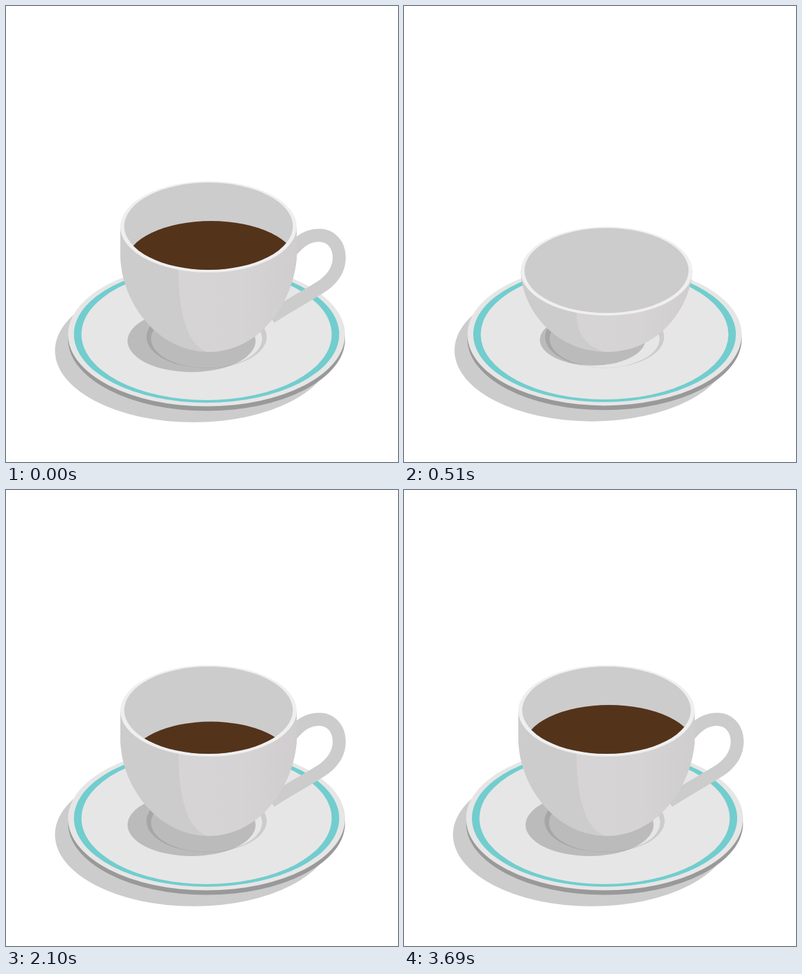
An HTML page with a canvas for the animation above (4290 ms loop, 600x700 px).

```html
<!DOCTYPE html>
<html lang="en">
<head>
<meta charset="utf-8">
<title>Cup of coffee</title>
<style>
html, body { margin: 0; width: 100%; height: 100%; overflow: hidden; background: #fff; }
canvas { display: block; width: 600px; height: 700px; }
</style>
</head>
<body>
<canvas id="stage" width="600" height="700"></canvas>
<script>
const LOOP = 4290, STEP = 30;
const ctx = document.getElementById('stage').getContext('2d');

const linear = u => u;
const smooth = u => u * u * (3 - 2 * u);

// Value of a [time, value] track at time t.
function at(t, track, ease = linear) {
  if (t <= track[0][0]) return track[0][1];
  for (let i = 1; i < track.length; i++) {
    const [t0, a] = track[i - 1], [t1, b] = track[i];
    if (t <= t1) return a + (b - a) * ease((t - t0) / (t1 - t0));
  }
  return track[track.length - 1][1];
}

const SAUCER = [[0, 0], [120, 1.104], [240, 0.99], [510, 0.99], [600, 1.034], [750, 1]];
const POP = [[240, 0], [300, 1]];
const HEIGHT = [[240, 48], [510, 124], [600, 192]];
const STRETCH = [[570, 1], [660, 1.05], [840, 0.9885], [990, 1]];
const HANDLE = [[570, 0], [720, 1]];
const LIQUID_TOP = [[1260, 406], [1500, 387], [1770, 369], [2310, 347], [2640, 330]];
const LIQUID_R = [[1260, 74], [1500, 80], [1770, 116], [2310, 126], [2640, 129]];

const WISP = new Path2D('M-4-113C-20-85-12-68-2-54C8-40 6-18 0 0' +
  'C14-20 14-40 4-55C-8-72-12-88-4-113Z');
const HANDLE_PATH = new Path2D('M436 377C450 360 462 352 479 352C498 352 510 367 510 386' +
  'C510 402 502 416 488 427C470 440 440 455 405 478');

const WISPS = [
  { x: 313, sx: 1, sy: 1, y: [[2340, 306], [2700, 263], [2850, 245], [3075, 218]],
    head: [[2310, 0], [2640, 1]], tail: [[2990, 0], [3330, 1]] },
  { x: 381, sx: -0.8, sy: 0.8, y: [[2220, 330], [2700, 295], [3300, 274]],
    head: [[2220, 0], [2620, 1]], tail: [[3330, 0], [3690, 1]] },
  { x: 257, sx: 0.85, sy: 0.85, y: [[2400, 330], [2700, 310], [3300, 281]],
    head: [[2400, 0], [2800, 1]], tail: [[3060, 0], [3420, 1]] }
];

function oval(x, y, rx, ry, fill) {
  ctx.beginPath();
  ctx.ellipse(x, y, rx, ry, 0, 0, 2 * Math.PI);
  if (fill) {
    ctx.fillStyle = fill;
    ctx.fill();
  }
}

function scaled(x, y, sx, sy, draw) {
  ctx.save();
  ctx.translate(x, y);
  ctx.scale(sx, sy);
  ctx.translate(-x, -y);
  draw();
  ctx.restore();
}

function saucer() {
  oval(287, 529, 212, 110, '#ccc');
  oval(307, 511.5, 212, 110, '#999');
  oval(307, 504.5, 212, 110, '#e6e6e6');
  oval(307, 504, 203, 105, '#72cdce');
  oval(307, 504, 191.5, 101, '#e6e6e6');
  oval(307, 508, 92, 48, '#ccc');
  oval(307, 510.8, 85, 44.8, '#e6e6e6');
}

function cupShadow(h) {
  const k = 0.5 + 0.5 * h / 192;
  oval(310 - 26 * k, 505 + 9 * k, 98 * k, 48 * k, 'rgba(0,0,0,.19)');
}

function handle(k) {
  if (k <= 0) return;
  scaled(436, 420, k, k, () => {
    ctx.lineWidth = 20;
    ctx.strokeStyle = '#ccc';
    ctx.stroke(HANDLE_PATH);
  });
}

function body(cy, rx, h) {
  const x0 = 310 - rx, x1 = 310 + rx;
  const wall = cy + 46 * Math.max(0, (h - 124) / 68);
  const side = wall + (531 - wall) * 0.48;
  ctx.save();
  ctx.beginPath();
  ctx.moveTo(x0, cy);
  ctx.lineTo(x0, wall);
  ctx.bezierCurveTo(x0 + 2, side, 232, 531, 310, 531);
  ctx.bezierCurveTo(388, 531, x1 - 5, side, x1, wall);
  ctx.lineTo(x1, cy);
  ctx.closePath();
  ctx.fillStyle = '#cdcccc';
  ctx.fill();
  ctx.clip();

  const top = cy + rx * 0.48;
  const shade = ctx.createLinearGradient(264, 0, 445, 0);
  shade.addColorStop(0, '#d7d4d5');
  shade.addColorStop(0.55, '#d6d3d4');
  shade.addColorStop(1, '#cfcdcd');
  ctx.beginPath();
  ctx.moveTo(264, cy);
  ctx.lineTo(264, top);
  ctx.bezierCurveTo(264, top + (531 - top) * 0.5, 276, 522, 310, 532);
  ctx.lineTo(460, 532);
  ctx.lineTo(460, cy);
  ctx.fillStyle = shade;
  ctx.fill();
  ctx.restore();
}

function inside(t, cy, rx, h) {
  oval(310, cy, rx, rx * 0.5185, '#efefef');
  oval(310, cy - 1, rx * 0.956, rx * 0.496, '#ccc');
  ctx.save();
  ctx.clip();
  oval(310, 424 + (192 - h) * 1.4, 82, 40, '#bcbcbc');
  if (t >= 1260) {
    const r = at(t, LIQUID_R), ry = r * 0.48;
    oval(310 + (r - 80) * 0.08, at(t, LIQUID_TOP) + ry, r, ry, '#54331b');
  }
  ctx.restore();
}

function cup(t) {
  const h = at(t, HEIGHT), pop = at(t, POP);
  if (pop <= 0) return;
  const cy = 531 - h;
  const rx = 135 * (1 - 0.6 * Math.pow(1 - h / 192, 3));
  scaled(310, 531, pop, pop, () => {
    cupShadow(h);
    scaled(310, 531, 1, at(t, STRETCH, smooth), () => {
      handle(at(t, HANDLE, smooth));
      body(cy, rx, h);
      inside(t, cy, rx, h);
    });
  });
}

function steam(t) {
  ctx.fillStyle = 'rgba(225,225,225,.84)';
  for (const w of WISPS) {
    const head = at(t, w.head), tail = at(t, w.tail);
    if (head <= tail) continue;
    ctx.save();
    ctx.translate(w.x, at(t, w.y));
    ctx.scale(w.sx, w.sy);
    ctx.beginPath();
    ctx.rect(-30, -114 * head, 60, 114 * (head - tail));
    ctx.clip();
    ctx.fill(WISP);
    ctx.restore();
  }
}

function draw(ms) {
  let t = Math.floor((ms % LOOP) / STEP) * STEP;
  if (t < STEP) t = LOOP;
  ctx.fillStyle = '#fff';
  ctx.fillRect(0, 0, 600, 700);
  const k = at(t, SAUCER, smooth);
  scaled(307, 505, k, k, saucer);
  cup(t);
  steam(t);
}

const start = performance.now();
function tick() {
  draw(performance.now() - start);
  requestAnimationFrame(tick);
}
tick();
</script>
</body>
</html>
```
